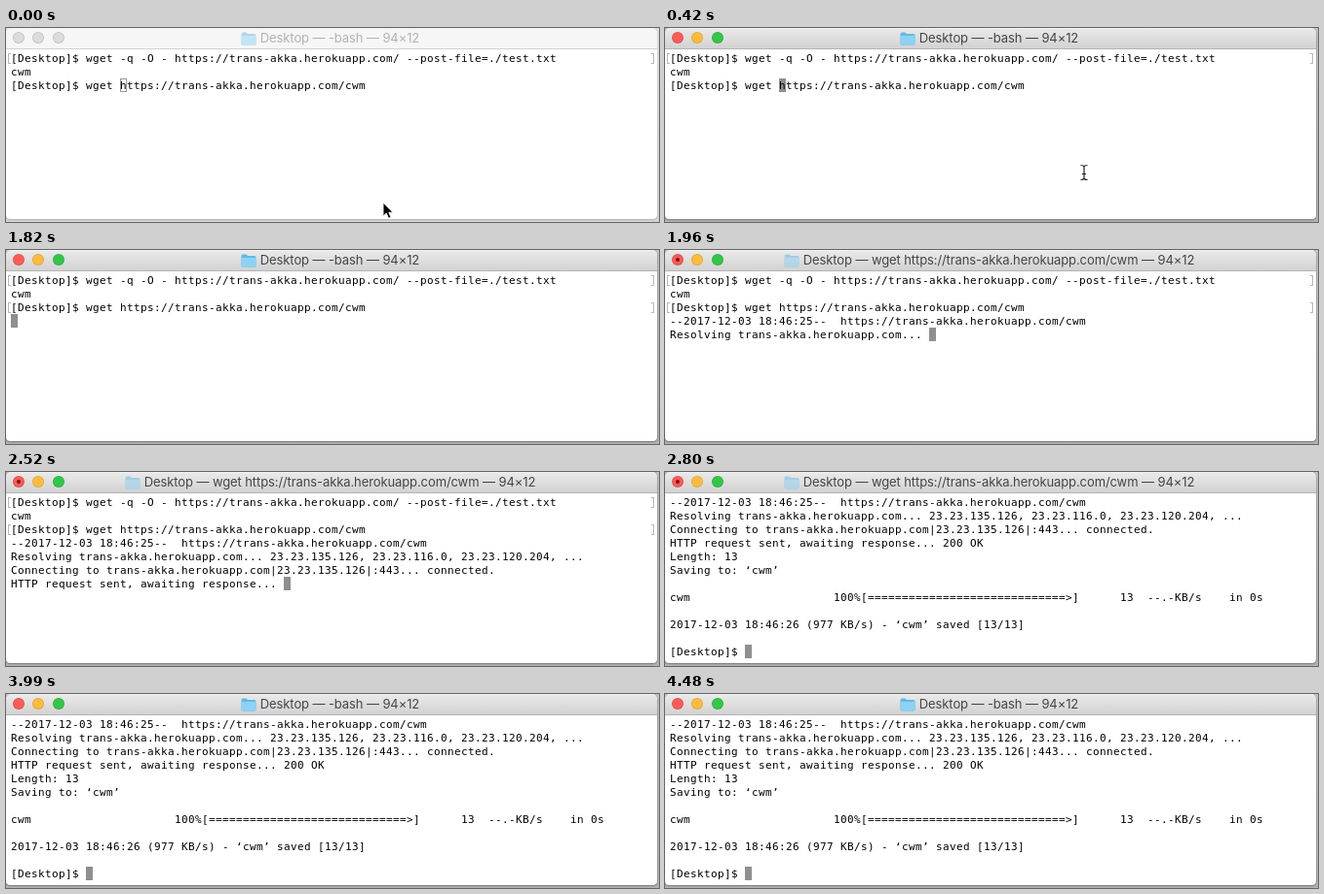
These frames come from a looping animation (670x200 px, 4.62 s). An HTML page:

```html
<!DOCTYPE html>
<html lang="en">
<head>
<meta charset="utf-8">
<title>Terminal</title>
<style>
  html, body { margin: 0; width: 100%; height: 100%; overflow: hidden; }
  #stage { position: relative; width: 670px; height: 200px; overflow: hidden; background: linear-gradient(#c4c4c4, #b4b4b4); }
  #stage.idle { background: linear-gradient(#e2e2e2, #d4d4d4); }
  #stage div, #stage pre, #stage i, #stage > svg { position: absolute; box-sizing: border-box; }

  #win { left: 0; top: 0; width: 668px; height: 197px; background: #fff; border-radius: 5px 5px 4px 4px;
    overflow: hidden; box-shadow: 0 0 1px rgba(0, 0, 0, .5), 0 1px 2px rgba(0, 0, 0, .3); }
  .idle #win { box-shadow: 0 0 1px rgba(0, 0, 0, .35), 0 1px 1px rgba(0, 0, 0, .12); }

  #bar { left: 0; top: 0; width: 100%; height: 22px; background: linear-gradient(#e9e9e9, #d2d2d2);
    border-bottom: 1px solid #b3b3b3; border-top: 1px solid #f3f3f3; }
  .idle #bar { background: #f6f6f6; border-bottom-color: #d2d2d2; }
  #bar i { top: 3px; width: 12px; height: 12px; border-radius: 50%; border: 1px solid rgba(0, 0, 0, .1); }
  .idle #bar i { background: #dcdcdc !important; }
  .busy #bar i:first-child::after { content: ""; position: absolute; left: 3px; top: 3px; width: 4px; height: 4px;
    border-radius: 50%; background: #7d1510; }

  #caption { left: 0; top: 0; width: 665px; height: 19px; display: flex; align-items: center; justify-content: center;
    gap: 4px; font: 13px/19px Inter, "Open Sans", sans-serif; letter-spacing: -.1px; color: #454545; white-space: pre; }
  #caption svg { flex: none; }
  .idle #caption { color: #b2b2b2; }
  .idle #caption svg, .busy #caption svg { opacity: .5; }

  #text { left: 5px; top: 25px; margin: 0; color: #000; font: 11px/14px "DejaVu Sans Mono", monospace;
    letter-spacing: calc(7px - 1ch); }
  #cursor { width: 7px; height: 14px; background: #8f8f8f; }
  .idle #cursor { background: none; border: 1px solid #9a9a9a; }
  .mark { left: 2px; width: 664px; height: 11px; }
  .mark::before, .mark::after { content: ""; position: absolute; top: 0; width: 3px; height: 11px;
    box-sizing: border-box; border: 1px solid #b8b8b8; }
  .mark::before { left: 0; border-right: 0; }
  .mark::after { right: 1px; border-left: 0; }
  #mark0 { top: 26px; }
  #mark2 { top: 54px; }
</style>
</head>
<body>
<div id="stage">
  <div id="win">
    <div id="bar">
      <i style="left:7px;background:#fc5b57"></i>
      <i style="left:27px;background:#fdbc40"></i>
      <i style="left:48px;background:#34c648"></i>
      <div id="caption">
        <svg width="16" height="14" viewBox="0 0 16 14">
          <path d="M.5 2q0-1.5 1.5-1.5h3.5l1.5 1.500h7q1.500 0 1.500 1.500v8.500q0 1.500-1.500 1.500H2Q.5 13.500.5 12z" fill="#66b7e2"/>
          <path d="M.5 4h15v8q0 1.500-1.500 1.500H2Q.5 13.500.5 12z" fill="#8dd2f5"/>
        </svg>
        <span id="title"></span>
      </div>
    </div>
    <div class="mark" id="mark0"></div>
    <div class="mark" id="mark2"></div>
    <div id="cursor"></div>
    <pre id="text"></pre>
  </div>
  <svg id="arrow" width="14" height="20" viewBox="-1 -1 14 20" style="margin:-1px">
    <path d="M0 0V14L3.300 11L5.500 16.200L8 15.200L5.800 10.200H10z" fill="#000" stroke="#fff" stroke-width=".9"/>
  </svg>
  <svg id="beam" width="10" height="18" viewBox="-5 -9 10 18" style="margin:-9px -5px">
    <path id="stem" d="M-3.500-7.500Q-.5-7.500 0-6Q.5-7.500 3.500-7.500M-3.500 7.500Q-.5 7.500 0 6Q.5 7.500 3.500 7.500M0-6V6M-2 1.500H2"
      fill="none" stroke="#222" stroke-width="1.200"/>
  </svg>
</div>
<script>
  const LOOP = 4620, ROWS = 12;
  const $ = id => document.getElementById(id);

  const host = "trans-akka.herokuapp.com";
  const url = `https://${host}/cwm`;
  const prompt = "[Desktop]$ ";
  const shell = "-bash", job = "wget " + url;

  const typed = `${prompt}wget -q -O - https://${host}/ --post-file=./test.txt\ncwm\n${prompt}${job}`;
  const entered = typed + "\n";
  const resolving = `${entered}--2017-12-03 18:46:25--  ${url}\nResolving ${host}... `;
  const connecting = `${resolving}23.23.135.126, 23.23.116.0, 23.23.120.204, ...\n` +
    `Connecting to ${host}|23.23.135.126|:443... `;
  const connected = connecting + "connected.\n";
  const waiting = connected + "HTTP request sent, awaiting response... ";
  const bar = "cwm".padEnd(24) + `100%[${"=".repeat(29)}>]      13  --.-KB/s    in 0s`;
  const saved = `${waiting}200 OK\nLength: 13\nSaving to: ‘cwm’\n\n${bar}\n\n` +
    `2017-12-03 18:46:26 (977 KB/s) - ‘cwm’ saved [13/13]\n\n${prompt}`;

  const steps = [
    { at: 0, text: typed, run: shell, col: 16, idle: true, arrow: [387, 180] },
    { at: 70, text: typed, run: shell, col: 16, idle: true, arrow: [430, 149] },
    { at: 420, text: typed, run: shell, col: 16, beam: [430, 149] },
    { at: 1820, text: entered, run: shell },
    { at: 1890, text: resolving, run: job },
    { at: 2030, text: connecting, run: job },
    { at: 2170, text: connected, run: job },
    { at: 2520, text: waiting, run: job },
    { at: 2800, text: saved, run: job },
    { at: 2870, text: saved, run: shell }
  ];

  function place(el, pos) {
    el.style.display = pos ? "" : "none";
    if (pos) [el.style.left, el.style.top] = pos.map(v => v + "px");
  }

  function show(step) {
    const all = step.text.split("\n"), lines = all.slice(-ROWS);
    const row = lines.length - 1, col = step.col ?? lines[row].length;
    $("stage").className = step.idle ? "idle" : step.run === job ? "busy" : "";
    $("title").textContent = `Desktop — ${step.run} — 94×12`;
    $("text").textContent = lines.join("\n");
    place($("cursor"), [5 + 7 * col, 24 + 14 * row]);
    const scrolled = all.length > ROWS;
    $("mark0").hidden = scrolled;
    $("mark2").hidden = scrolled || step.text === typed;
    place($("arrow"), step.arrow);
    place($("beam"), step.beam);
  }

  let current;
  function tick() {
    const t = performance.now() % LOOP;
    const step = steps.findLast(s => s.at <= t);
    if (step !== current) show(current = step);
    requestAnimationFrame(tick);
  }
  tick();
</script>
</body>
</html>
```
